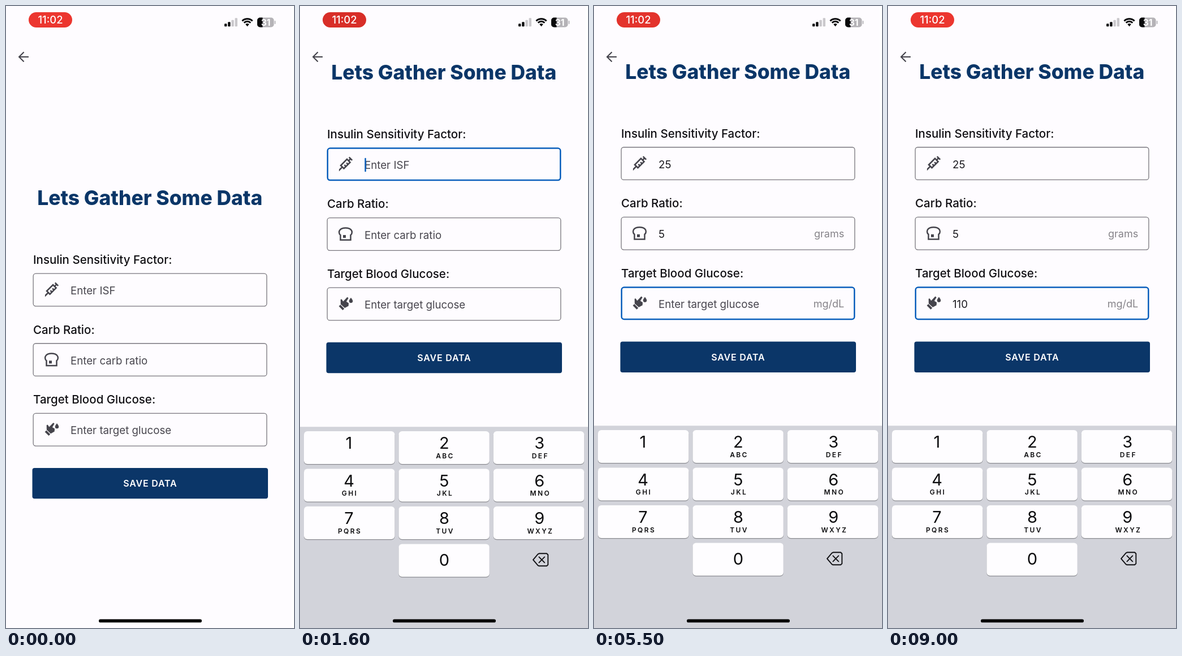
These frames come from a looping animation (509 px wide and 1100 px high, 9100 ms). An HTML page with a canvas:

```html
<!DOCTYPE html>
<html lang="en">
<head>
<meta charset="utf-8">
<title>Gather data form</title>
<style>
html, body { margin: 0; width: 100%; height: 100%; overflow: hidden; background: #fff; }
canvas { display: block; width: 509px; height: 1100px; }
</style>
</head>
<body>
<canvas id="stage" width="509" height="1100"></canvas>
<script>
const ctx = document.getElementById('stage').getContext('2d');
const LOOP = 9100, STEP = 100;
const NAVY = '#0b3668', BLUE = '#0a5fbc', INK = '#45444c', PAPER = '#fefcff';

// Input timeline in ms: focus a field or type a digit into it
const events = [
  { at: 1150, field: 0 },
  { at: 2300, field: 0, key: '2' },
  { at: 2700, field: 0, key: '5' },
  { at: 3300, field: 1 },
  { at: 3900, field: 1, key: '5' },
  { at: 4900, field: 2 },
  { at: 6300, field: 2, key: '1' },
  { at: 6700, field: 2, key: '1' },
  { at: 7300, field: 2, key: '0' }
];

const fields = [
  { label: 'Insulin Sensitivity Factor:', hint: 'Enter ISF', unit: '', icon: syringe },
  { label: 'Carb Ratio:', hint: 'Enter carb ratio', unit: 'grams', icon: bread },
  { label: 'Target Blood Glucose:', hint: 'Enter target glucose', unit: 'mg/dL', icon: hand }
];

const keys = ['1', '2 ABC', '3 DEF', '4 GHI', '5 JKL', '6 MNO', '7 PQRS', '8 TUV', '9 WXYZ', '', '0'];

const needle = new Path2D('M11.15,15.18L9.73,13.77L11.15,12.35L12.56,13.77L13.97,12.35' +
  'L12.56,10.94L13.97,9.53L15.39,10.94L16.8,9.53L13.97,6.7L6.9,13.77L9.73,16.6Z' +
  'M3.08,19L6.2,15.89L4.08,13.77L13.97,3.87L16.1,6L17.5,4.58L16.1,3.16L17.5,1.75' +
  'L21.75,6L20.34,7.4L18.92,6L17.5,7.4L19.63,9.53L9.73,19.42L7.61,17.3L3.08,21.83Z');
const loaf = new Path2D('M-9 10.6V1.8C-12-.2-12-5-9.8-7.4C-7.2-10.6-3-10.8 0-10.8' +
  'C3-10.8 7.2-10.6 9.8-7.4C12-5 12-.2 9 1.8V10.6Z');
const palm = new Path2D('M-8.8-7.8L-6.8-8.4L-4.2-4.4L3-12L5.2-10.4L1.4-4L5.6-1.4L5.2 3.6L-1.4 7.2L-8.6 .6Z');
const drop = new Path2D('M9.5-11C11.2-8.4 12.8-6.8 12.8-5A3.3 3.3 0 0 1 6.2-5C6.2-6.8 7.8-8.4 9.5-11Z');

function text(str, x, y, size, color, { weight = 400, align = 'left', gap = 0 } = {}) {
  ctx.font = `${weight} ${size}px Inter, Roboto, sans-serif`;
  ctx.letterSpacing = gap + 'px';
  ctx.textAlign = align;
  ctx.fillStyle = color;
  ctx.fillText(str, x, y);
}

function box(x, y, w, h, r, color) {
  ctx.beginPath();
  ctx.roundRect(x, y, w, h, r);
  ctx.fillStyle = color;
  ctx.fill();
}

function line(points, width, color, close) {
  ctx.beginPath();
  points.forEach(([x, y]) => ctx.lineTo(x, y));
  if (close) ctx.closePath();
  ctx.lineWidth = width;
  ctx.strokeStyle = color;
  ctx.stroke();
}

function at(x, y, draw) {
  ctx.save();
  ctx.translate(x, y);
  draw();
  ctx.restore();
}

function syringe() {
  ctx.scale(1.295, 1.295);
  ctx.translate(-12, -12);
  ctx.fillStyle = INK;
  ctx.fill(needle, 'evenodd');
}

function bread() {
  ctx.lineWidth = 2.5;
  ctx.strokeStyle = INK;
  ctx.stroke(loaf);
  box(-4.5, 1.8, 5, 5, 0, INK);
}

function hand() {
  ctx.fillStyle = INK;
  ctx.fill(palm);
  ctx.fill(drop);
  line([[-10.5, 2.8], [-3.6, 9.7]], 3.8, INK);
}

function statusBar(t) {
  const glow = 0.5 + 0.5 * Math.cos((t - 250) / 3000 * 2 * Math.PI);
  const mix = (a, b) => Math.round(a + (b - a) * glow);
  box(40, 11, 77, 27, 13.5, `rgb(${mix(215, 238)},${mix(46, 55)},${mix(40, 47)})`);
  text('11:02', 78.5, 31, 18.4, '#fff', { weight: 500, align: 'center' });

  [5, 8, 11.5, 15].forEach((h, i) =>
    box(386 + i * 6.2, 36.3 - h, 4.4, h, 1.2, i < 2 ? '#08080a' : '#cac8cc'));

  // Wi-Fi arcs
  ctx.strokeStyle = ctx.fillStyle = '#08080a';
  ctx.lineWidth = 3;
  for (const r of [8.2, 12.8]) {
    ctx.beginPath();
    ctx.arc(426.5, 35.5, r, -Math.PI * 0.75, -Math.PI * 0.25);
    ctx.stroke();
  }
  ctx.beginPath();
  ctx.moveTo(426.5, 36.3);
  ctx.arc(426.5, 35.5, 4.6, -Math.PI * 0.75, -Math.PI * 0.25);
  ctx.fill();

  // Battery
  ctx.save();
  ctx.beginPath();
  ctx.roundRect(444, 20.5, 29.5, 17, 5);
  ctx.clip();
  box(444, 20, 30, 18, 0, '#b5b3b7');
  box(444, 20, 9.5, 18, 0, '#08080a');
  ctx.restore();
  box(474.6, 26, 1.8, 6, 1, '#b5b3b7');
  text('31', 459, 34.8, 15.5, '#fff', { weight: 700, align: 'center' });
}

function backArrow() {
  line([[40, 90], [24, 90]], 2.1, INK);
  line([[31.6, 81.5], [23.1, 90], [31.6, 98.5]], 2.1, INK);
}

function form(t, shift) {
  const past = events.filter(e => e.at <= t);
  const last = past[past.length - 1];
  text('Lets Gather Some Data', 254.3, 352 - shift, 35.4, NAVY, { weight: 800, align: 'center' });

  fields.forEach((f, i) => {
    const y = 473 + i * 123.6 - shift;
    const mine = past.filter(e => e.field === i);
    const value = mine.map(e => e.key || '').join('');
    const active = last && last.field === i;
    const lit = active && t >= 1300;

    text(f.label, 48, y - 17, 20.5, '#111014', { weight: 500 });
    const w = lit ? 2.5 : 1.3;
    ctx.beginPath();
    ctx.roundRect(47.5 + w / 2, y - 0.5 + w / 2, 414 - w, 59 - w, 4.5);
    ctx.lineWidth = w;
    ctx.strokeStyle = lit ? BLUE : '#78767d';
    ctx.stroke();

    at(80.5, y + 28.8, f.icon);
    if (mine.length && f.unit) text(f.unit, 442.2, y + 35.7, 18, '#858388', { align: 'right' });
    text(value || f.hint, 114, y + 37.2, 18.7, value ? '#1b1a1f' : '#47454d');
    if (active && (t - last.at) % 1000 < 500) {
      const x = value ? 113 + ctx.measureText(value).width : 115.3;
      box(x - 1, y + 18, 2.5, 24.5, 1, BLUE);
    }
  });

  box(46.5, 817 - shift, 416.5, 54.3, 4, NAVY);
  text('SAVE DATA', 254.9, 850 - shift, 16, '#fff', { weight: 600, align: 'center', gap: 0.8 });
}

function keyboard(t, drop) {
  const pressed = events.find(e => e.key && t >= e.at && t < e.at + STEP);
  ctx.save();
  ctx.translate(0, drop);
  box(0, 742.3, 509, 358, 0, '#d2d3da');
  keys.forEach((k, i) => {
    if (!k) return;
    const [digit, letters] = k.split(' ');
    const col = i % 3;
    const x = 7 + col * 167.4, y = 750 + Math.floor(i / 3) * 66.5;
    const mid = 86.5 + col * 168.4;
    const down = pressed && pressed.key === digit;
    box(x, y + 1.3, 160.4, 58, 6, '#8b8c91');
    box(x, y, 160.4, 58, 6, down ? '#b7c3d3' : '#fefdff');
    text(digit, mid, y + (digit === '0' ? 38 : 31), 29, '#0c0c0e', { align: 'center' });
    if (letters) text(letters, mid + 1.6, y + 47.8, 12, '#0c0c0e', { weight: 600, align: 'center', gap: 2.4 });
  });
  // Delete key
  at(425, 977.3, () => {
    ctx.lineJoin = 'round';
    ctx.lineCap = 'round';
    line([[-13, 0], [-4.5, -10], [-2.5, -11], [11, -11], [13.3, -8.8], [13.3, 8.8], [11, 11], [-2.5, 11], [-4.5, 10]], 1.9, '#111114', true);
    line([[-2.6, -5], [7.2, 5]], 1.9, '#111114');
    line([[7.2, -5], [-2.6, 5]], 1.9, '#111114');
  });
  ctx.restore();
}

// Critically damped spring: share of the way still to go
function remaining(t) {
  const u = Math.max(0, t - 1149.4) * 0.0162;
  return t > 2000 ? 0 : (1 + u) * Math.exp(-u);
}

function draw(now) {
  const t = Math.floor((now % LOOP) / STEP) * STEP;
  const rest = remaining(t);
  box(0, 0, 509, 1100, 0, '#fff');
  box(0, 0, 505, 1100, 0, PAPER);
  backArrow();
  form(t, 223.4 * (1 - rest));
  statusBar(t);
  if (t >= 1300) keyboard(t, 358 * rest);
  box(164, 1084.6, 182, 5.6, 2.8, '#000');
}

let start;
function tick(now) {
  start ??= now;
  draw(now - start);
  requestAnimationFrame(tick);
}
requestAnimationFrame(tick);
</script>
</body>
</html>
```
